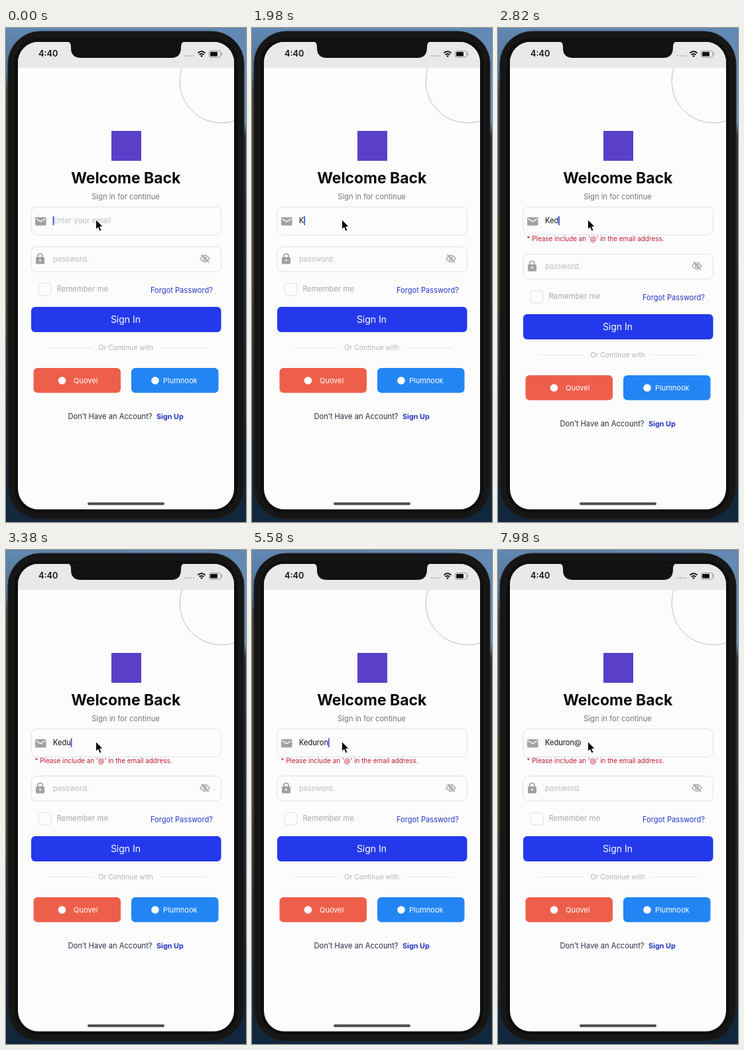
Animation, 362 px wide and 744 px high, one loop 8 s. Source, as an HTML page:

```html
<!DOCTYPE html>
<html lang="en">
<head>
<meta charset="utf-8">
<title>Sign in</title>
<style>
  html, body { margin: 0; width: 100%; height: 100%; overflow: hidden; background: #101418; }
  svg { display: block; width: 100vw; height: 100vh; font: 11.2px Inter, "Open Sans", sans-serif; }
  .field { fill: none; stroke: #dfdfe9; }
  .hint { fill: #bdbdc5; }
  .icon { fill: #a0a0a6; }
  .mid { text-anchor: middle; }
  .link { fill: #2637c6; }
  .on-button { fill: #fff; }
</style>
</head>
<body>
<svg viewBox="0 0 362 744" preserveAspectRatio="none">
  <defs>
    <linearGradient id="left-view" x2="0" y2="1">
      <stop offset="0" stop-color="#6189b4"/>
      <stop offset=".09" stop-color="#53718f"/>
      <stop offset=".13" stop-color="#4b4336"/>
      <stop offset=".55" stop-color="#4a3d2a"/>
      <stop offset=".8" stop-color="#1d2833"/>
      <stop offset="1" stop-color="#10273d"/>
    </linearGradient>
    <linearGradient id="right-view" x2="0" y2="1">
      <stop offset="0" stop-color="#6189b4"/>
      <stop offset=".19" stop-color="#6d8fb2"/>
      <stop offset=".22" stop-color="#2d3238"/>
      <stop offset=".8" stop-color="#1c2631"/>
      <stop offset="1" stop-color="#10273d"/>
    </linearGradient>
    <clipPath id="screen"><rect x="18" y="21" width="326" height="704" rx="31"/></clipPath>
  </defs>

  <rect width="181" height="744" fill="url(#left-view)"/>
  <rect x="181" width="181" height="744" fill="url(#right-view)"/>
  <rect x="3" y="5" width="356" height="735" rx="49" fill="#161616" stroke="#242426"/>
  <rect x="13" y="16" width="336" height="714" rx="36" fill="#0e0e0e"/>

  <g clip-path="url(#screen)">
    <rect x="18" y="21" width="326" height="704" fill="#fcfcfc"/>
    <circle cx="325" cy="80" r="63" fill="none" stroke="#bdbdc1"/>
    <rect x="18" y="21" width="326" height="39" fill="#e9e9eb"/>
  </g>
  <path d="M92 20Q98 21 98 28V30Q98 45 113 45H249Q264 45 264 30V28Q264 21 270 20Z" fill="#121212"/>

  <g fill="#101012">
    <text x="49" y="43.3" font-size="12.7" font-weight="600">4:40</text>
    <path d="M270 42H284" stroke="#b0b0b4" stroke-width="2" stroke-dasharray="2 2"/>
    <path d="M289.5 37.8Q295 32.7 300.5 37.8M291.6 40.4Q295 37.4 298.4 40.4"
          fill="none" stroke="#101012" stroke-width="1.9"/>
    <path d="M293 42Q295 40.3 297 42L295 44.1Z"/>
    <rect x="306.5" y="34.5" width="17.5" height="9.5" rx="2.5" fill="none" stroke="#939398"/>
    <rect x="308" y="36" width="11" height="6.5" rx="1.3"/>
    <path d="M325.3 37.5V41" stroke="#939398" stroke-width="1.3"/>
  </g>

  <rect x="159" y="155" width="45" height="45" fill="#5a40c8"/>

  <text class="mid" x="180.7" y="233.5" font-size="22.9" font-weight="700" fill="#080808">Welcome Back</text>
  <text class="mid" x="180.5" y="258" fill="#77777c">Sign in for continue</text>

  <rect class="field" x="38" y="269.5" width="286.5" height="42" rx="8"/>
  <rect class="icon" x="44" y="285" width="16.5" height="12.5" rx="1.6"/>
  <path d="M45.5 287.3L52.2 291.6L59 287.3" fill="none" stroke="#fcfcfc" stroke-width="1.4"/>
  <text id="placeholder" class="hint" x="71" y="294.3" font-size="11.4">Enter your email</text>
  <text id="typed" x="71" y="294.3" font-size="11.1" fill="#101014"></text>
  <rect id="caret" y="283.5" width="1.6" height="13.5" fill="#3346e6"/>
  <text id="error" x="43.5" y="321" font-size="9.9" fill="#bd1c34">* Please include an '@' in the email address.</text>

  <g id="lower">
    <rect class="field" x="38" y="329.5" width="286.5" height="37.5" rx="8"/>
    <rect class="icon" x="45" y="345" width="13" height="10.5" rx="1.5"/>
    <path d="M48 345V343Q48 340 51.5 340T55 343V345" fill="none" stroke="#a0a0a6" stroke-width="1.7"/>
    <circle cx="51.5" cy="350" r="1.4" fill="#fcfcfc"/>
    <text class="hint" x="71" y="352" font-size="11">password.</text>
    <g fill="none" stroke="#9a9aa0" stroke-width="1.2">
      <path d="M293 347.3Q300 337.5 307 347.3Q300 357 293 347.3ZM294.5 341L306 353.7"/>
      <circle cx="300" cy="347.3" r="2.4"/>
    </g>

    <rect class="field" x="49" y="384.5" width="19" height="18.5" rx="4"/>
    <text x="76.5" y="396.6" font-size="11.3" fill="#a8a8ae">Remember me</text>
    <text class="link" x="218" y="398.8" font-size="11.1">Forgot Password?</text>

    <rect x="38" y="420" width="286.5" height="38" rx="6" fill="#2439ec"/>
    <text class="mid on-button" x="180.5" y="444" font-size="14">Sign In</text>

    <path d="M63 481.5H129M233 481.5H301" stroke="#e4e4f0"/>
    <text class="mid" x="180.7" y="484.6" font-size="10.4" fill="#b3b3b9">Or Continue with</text>

    <rect x="41.5" y="512" width="131.5" height="37.5" rx="6" fill="#ee5f4b"/>
    <rect x="189" y="512" width="131.5" height="37.5" rx="6" fill="#2385f4"/>
    <g class="on-button">
      <circle cx="84.5" cy="531" r="5.8"/>
      <circle cx="225" cy="531" r="5.8"/>
      <text x="102" y="535" font-size="11">Quovel</text>
      <text x="237" y="535" font-size="11">Plumnook</text>
    </g>

    <text x="93.5" y="588.8" fill="#25303f">Don’t Have an Account?</text>
    <text class="link" x="227" y="588.8" font-size="10.8" font-weight="700">Sign Up</text>
  </g>

  <rect x="123" y="714.5" width="116" height="4" rx="2" fill="#4c4c4e"/>
  <path d="M135.5 288.5V303.5L138.9 300.4L141.2 306L144 304.8L141.7 299.4H146.2Z"
        fill="#080808" stroke="#fcfcfc" stroke-width="1" stroke-linejoin="round"/>
</svg>

<script>
  const LOOP = 8000, BLINK = 1000, ERROR_AT = 2040, ERROR_SHIFT = 11;
  const ENTRY = "Keduron@";
  const KEY_TIMES = [1940, 2320, 2780, 3250, 3700, 4150, 4600, 7500];
  const [placeholder, typed, caret, error, lower] =
    ["placeholder", "typed", "caret", "error", "lower"].map(id => document.getElementById(id));
  const show = (element, visible) =>
    element.setAttribute("visibility", visible ? "visible" : "hidden");

  function draw(time) {
    const count = KEY_TIMES.filter(key => key <= time).length;
    const lastKey = count ? KEY_TIMES[count - 1] : 0;
    typed.textContent = ENTRY.slice(0, count);
    show(placeholder, !count);

    // The caret fades out and back in, restarting at each key press.
    const glow = 0.5 + 1.5 * Math.cos(2 * Math.PI * (time - lastKey) / BLINK);
    caret.setAttribute("x", 71 + (count ? typed.getComputedTextLength() : -0.4));
    caret.setAttribute("opacity", Math.min(1, Math.max(0, glow)));

    const invalid = time >= ERROR_AT;
    show(error, invalid);
    lower.setAttribute("transform", `translate(0 ${invalid ? ERROR_SHIFT : 0})`);
  }

  const start = performance.now();
  function tick() {
    draw((performance.now() - start) % LOOP);
    requestAnimationFrame(tick);
  }
  tick();
</script>
</body>
</html>
```
